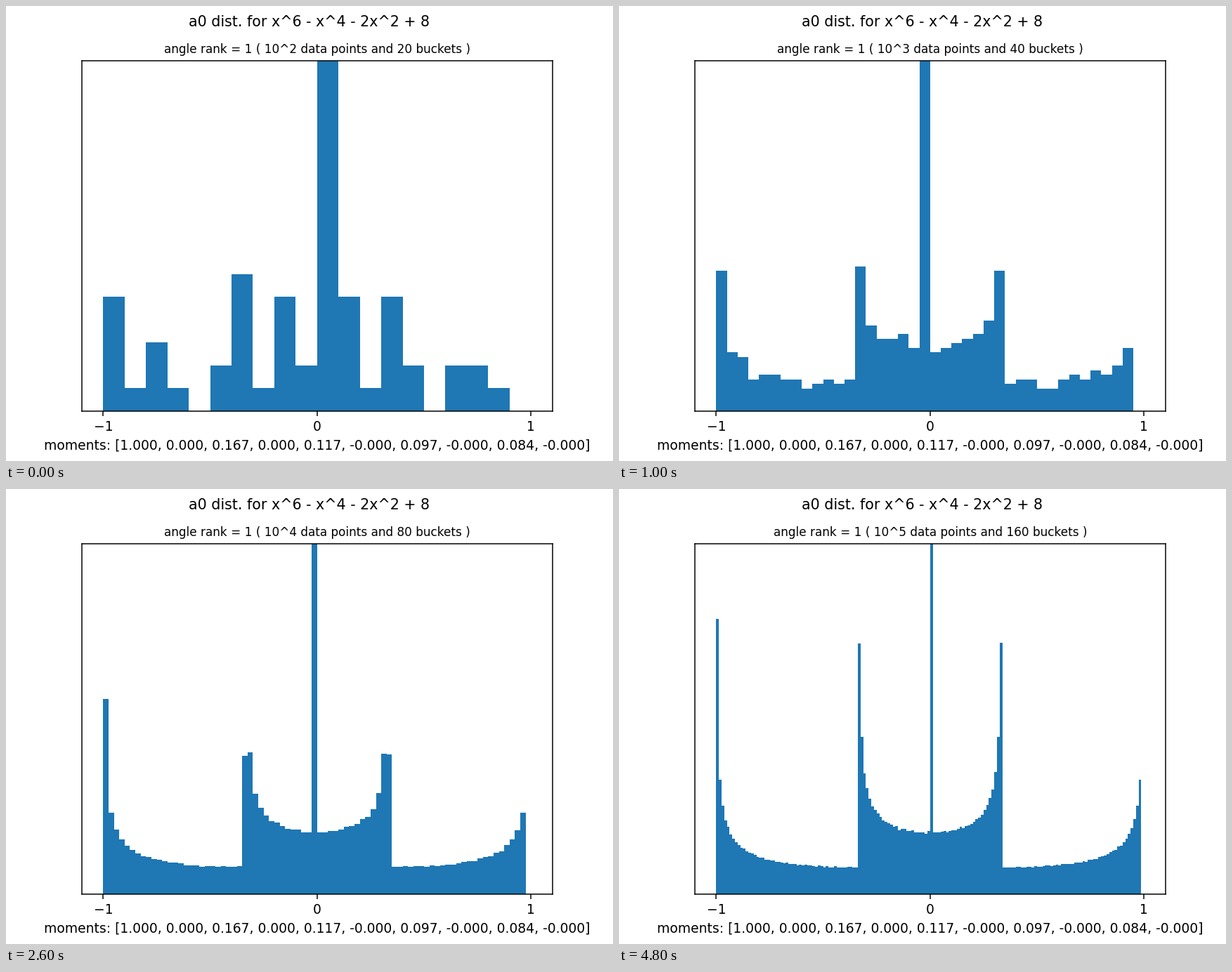
These frames come from a looping animation (864x648 px, 6 s). A matplotlib script:

```python
import numpy as np
import matplotlib.pyplot as plt
from matplotlib.animation import FuncAnimation

plt.rcParams["font.family"] = "DejaVu Sans"
STAGES = 4
MOMENTS = "1.000, 0.000, 0.167, 0.000, 0.117, -0.000, 0.097, -0.000, 0.084, -0.000"


def normalized_traces(count):
    """Traces of the first Frobenius powers, scaled to [-1, 1]."""
    power = np.arange(1, count + 1)
    half = power // 2
    angle = np.arccos(0.75)
    trace = ((-1.0) ** half + 2 * np.cos(half * angle)) / 3
    return np.where(power % 2, 0.0, trace)


fig, ax = plt.subplots(figsize=(6.4, 4.8), dpi=135)
fig.suptitle("a0 dist. for x^6 - x^4 - 2x^2 + 8", fontsize=11)


def update(frame):
    stage = min(frame, STAGES - 1)
    exponent, buckets = stage + 2, 20 * 2 ** stage
    ax.clear()
    # The half-open range leaves out the last bucket's right edge.
    edges = np.arange(-1, 1, 2 / buckets)
    ax.hist(normalized_traces(10 ** exponent), bins=edges, density=True,
            color="#1f77b4")
    ax.set(xlim=(-1.1, 1.1), ylim=(0, 1.6), xticks=[-1, 0, 1], yticks=[])
    ax.set_xlabel(f"moments: [{MOMENTS}]")
    ax.set_title(f"angle rank = 1 ( 10^{exponent} data points "
                 f"and {buckets} buckets )", fontsize=9)
    return ax.patches


anim = FuncAnimation(fig, update, frames=6, interval=1000,
                     init_func=lambda: [], repeat=True, repeat_delay=0)
plt.show()
```
